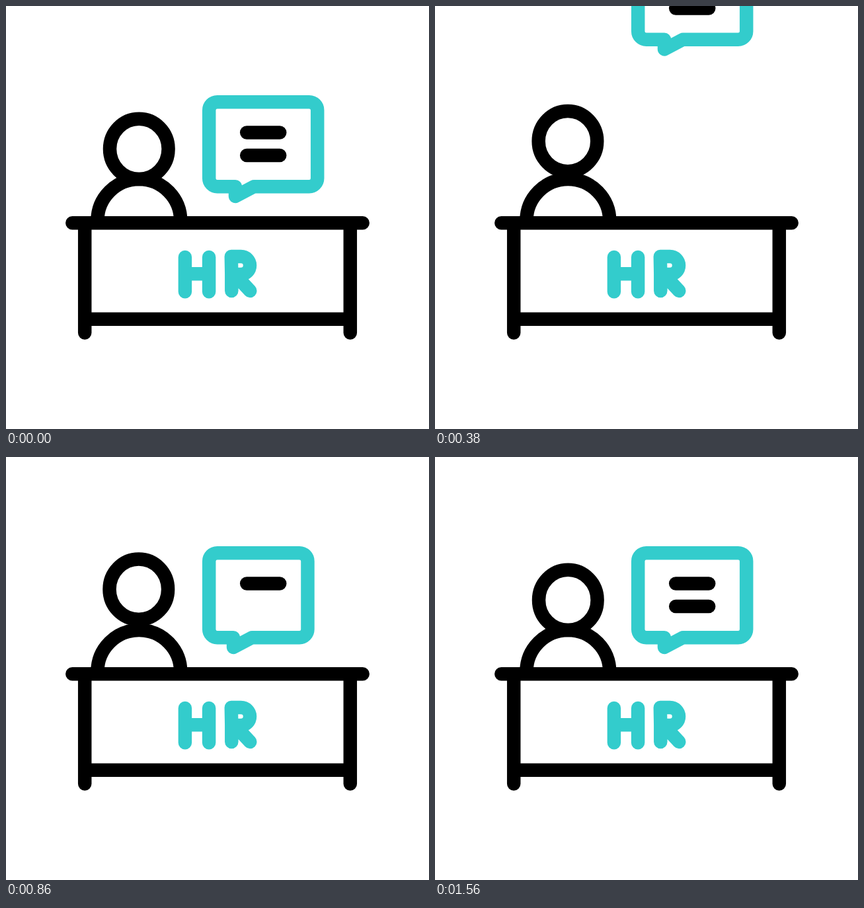
Write an HTML page that moves like this. It is 640 by 640 pixels and loops after 1620 ms.

```html
<!DOCTYPE html>
<html lang="en">
<head>
<meta charset="utf-8">
<title>HR desk</title>
<style>
  html, body { margin: 0; height: 100%; overflow: hidden; background: #fff; }
  svg { display: block; width: 100vw; height: 100vh; }
  path, ellipse {
    fill: none; stroke: #000; stroke-width: 20.5;
    stroke-linecap: round; stroke-linejoin: round;
  }
  .accent { stroke: #3cc; }
</style>
</head>
<body>
<svg viewBox="0 0 640 640">
  <ellipse id="head" cx="201.3" cy="216.4" rx="44.3" ry="45.6"/>
  <path d="M138.4 325A62.9 62.9 0 0 1 264.2 325"/>
  <path d="M100.3 328.2H539.7M119.2 328.2V494.6M520.8 328.2V494.6M119.2 473.8H520.8"/>
  <path class="accent" d="M270.9 380V432.2M307.1 380V432.2M270.9 405.2H307.1"/>
  <path class="accent" d="M341.3 431V406H355.5A13.5 13.5 0 0 0 355.5 379H340.8L341.3 406M346 406L369.3 431"/>
  <g id="message">
    <path id="bubble" class="accent"/>
    <path id="line1"/>
    <path id="line2"/>
  </g>
</svg>
<script>
const LOOP = 1620, SWAP = 540, LEFT = 307.2, WIDTH = 164;
const [head, message, bubble, line1, line2] =
  ['head', 'message', 'bubble', 'line1', 'line2'].map(id => document.getElementById(id));

const progress = (t, start, end) => Math.min(1, Math.max(0, (t - start) / (end - start)));
const smooth = u => u * u * (3 - 2 * u);

// Three linear nods, the last one slightly quicker.
function nod(t) {
  const half = t < 1080 ? 270 : 240;
  const local = t < 1080 ? t % 540 : Math.min(t - 1080, 480);
  return 1 - Math.abs(local / half - 1);
}

function bubblePath(width, shrink) {
  const left = LEFT + 2 * shrink, right = left + width;
  const top = 145.2 + 13 * shrink, bottom = 273.2 + 1.4 * shrink;
  const r = Math.min(12.5, width / 2);
  const tip = left + 7 + 0.2 * width;
  const join = Math.min(tip + 28, right - r);
  const corner = (x, y) => `A${r} ${r} 0 0 1 ${x} ${y}`;
  return `M${tip} ${bottom}H${Math.min(tip, left + r)}${corner(left, bottom - r)}V${top + r}` +
    `${corner(left + r, top)}H${right - r}${corner(right, top + r)}V${bottom - r}` +
    `${corner(right - r, bottom)}H${join}L${tip} 288Z`;
}

function drawLine(line, y, u) {
  line.setAttribute('d', u > 0 ? `M364.2 ${y}h${50 * u}` : '');
}

function render(t) {
  const up = nod(t), leaving = t < SWAP;
  head.setAttribute('transform', `translate(${-0.6 * up} ${-20 * up})`);

  const rise = leaving ? 300 * smooth(t / 571) : 0;
  message.setAttribute('transform', `translate(0 ${-rise})`);

  const grow = leaving ? 1 : progress(t, SWAP, 901);
  const shrink = leaving ? 0 : 2 * (1 - progress(t, SWAP, 700));
  bubble.setAttribute('d', bubblePath(31 + (WIDTH - 31) * grow, shrink));
  drawLine(line1, 191.4, leaving ? 1 : progress(t, 780, 850));
  drawLine(line2, 226, leaving ? 1 : progress(t, 880, 960));
}

function tick() {
  render(performance.now() % LOOP);
  requestAnimationFrame(tick);
}
tick();
</script>
</body>
</html>
```
